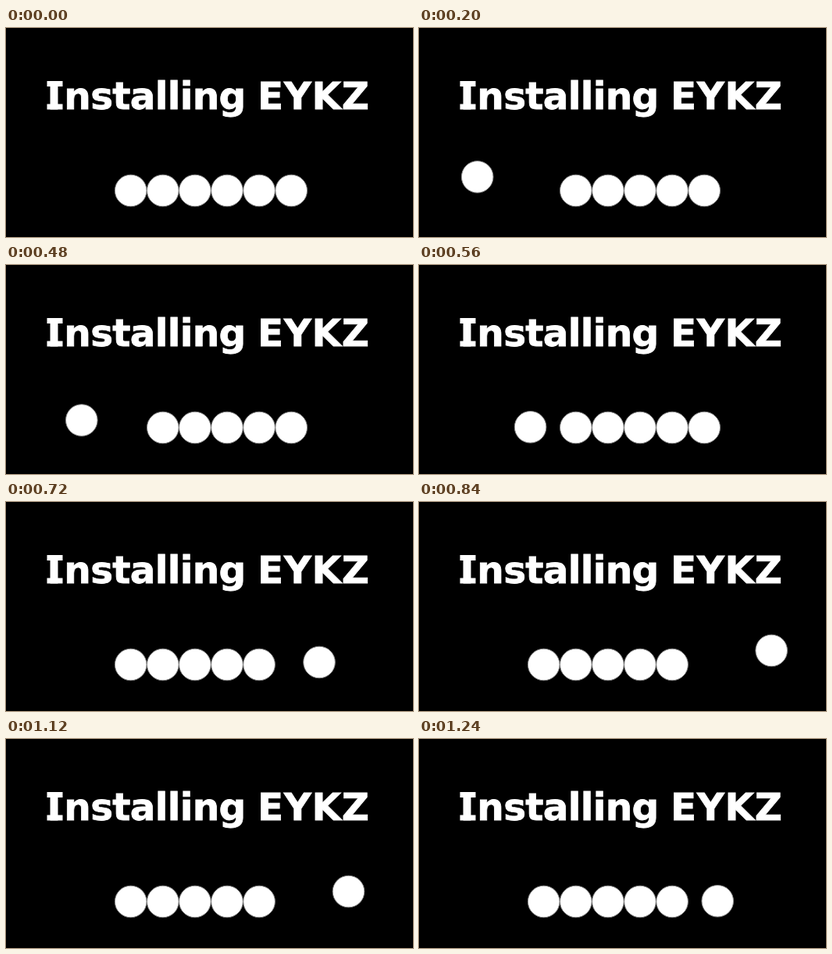
An HTML page for the animation above (1280 ms loop, 521x268 px).

```html
<!DOCTYPE html>
<html lang="en">
<head>
<meta charset="utf-8">
<title>Installing</title>
<style>
  html, body { margin: 0; width: 100%; height: 100%; overflow: hidden; background: #000; }
  svg { display: block; }
  text { font: bold 48.5px "DejaVu Sans", sans-serif; stroke: #fff; stroke-width: .8; }
  circle { stroke: #8a8a8a; }
</style>
</head>
<body>
<svg width="521" height="268" viewBox="0 0 521 268" fill="#fff">
  <text x="52.5" y="104" dx="0 4.5" letter-spacing="-.7">Installing</text>
  <text x="322" y="104" letter-spacing=".6">EYKZ</text>
  <path d="M52.5 68h20v7h-20zM52.5 97.5h20v7h-20z"/>
  <g id="balls"></g>
</svg>
<script>
const LOOP = 1280, ROD = 214, SWING = 30, REST_Y = 208.5;
const group = document.getElementById('balls');

const balls = Array.from({ length: 6 }, (_, i) => {
  const ball = document.createElementNS('http://www.w3.org/2000/svg', 'circle');
  ball.setAttribute('cx', 159.7 + i * 41.1);
  ball.setAttribute('cy', REST_Y);
  ball.setAttribute('r', 20.3);
  return group.appendChild(ball);
});

// Angle in degrees: slows down towards the peak, speeds up on the way back.
function swing(t, start, peak, end) {
  const distance = t < peak ? (peak - t) / (peak - start) : (t - peak) / (end - peak);
  return SWING * (1 - Math.min(1, distance) ** 1.68);
}

function pose(ball, degrees) {
  const angle = degrees * Math.PI / 180;
  const dx = ROD * Math.sin(angle), dy = ROD * (Math.cos(angle) - 1);
  ball.setAttribute('transform', `translate(${dx} ${dy})`);
}

function draw() {
  const t = performance.now() % LOOP;
  pose(balls[0], -swing(t, 27, 320, 586));
  pose(balls[5], swing(t, 659, 960, 1270));
  requestAnimationFrame(draw);
}
draw();
</script>
</body>
</html>
```
